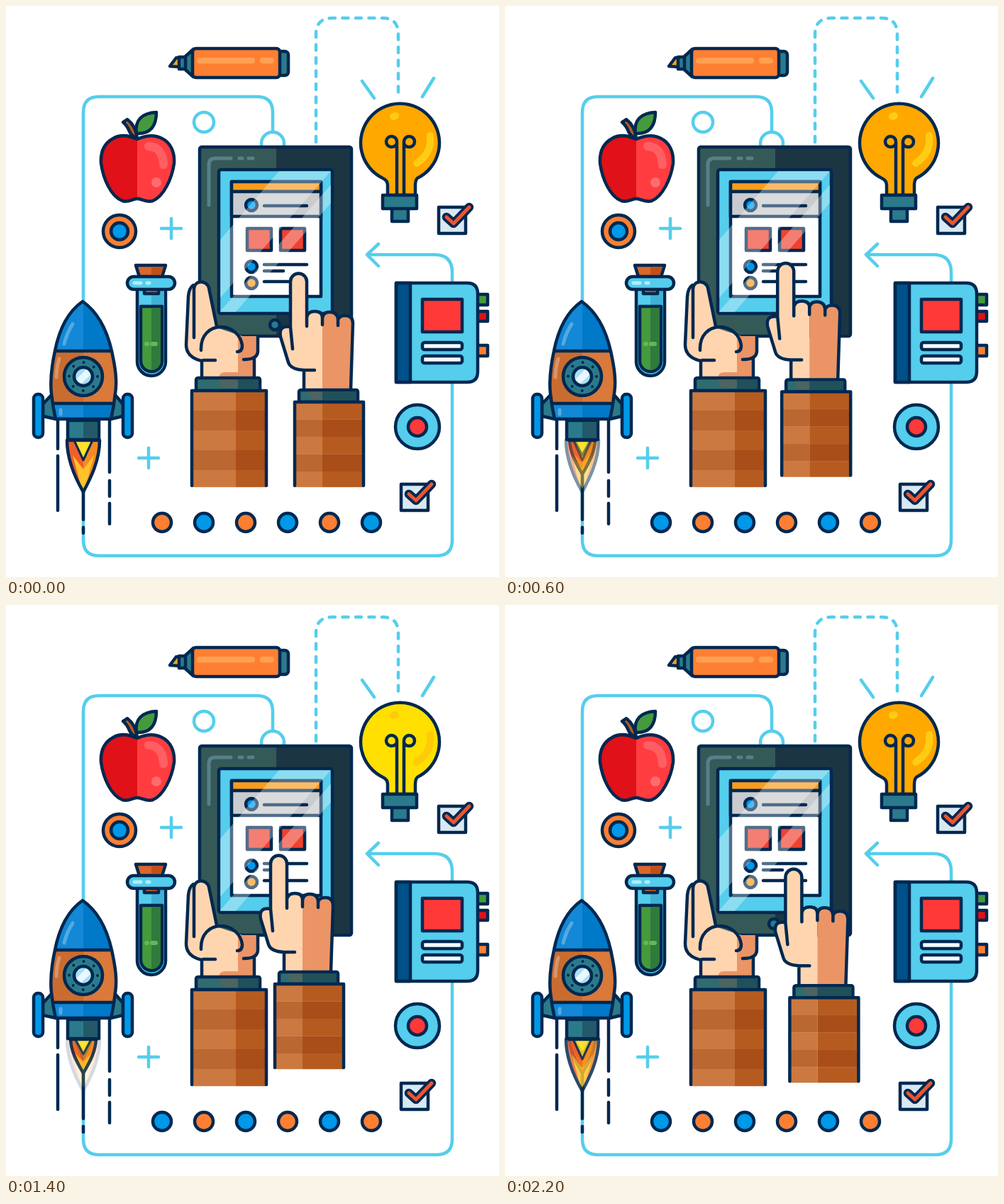
These frames come from a looping animation (695x806 px, 2400 ms). An HTML page:

```html
<!DOCTYPE html>
<html lang="en">
<head>
<meta charset="utf-8">
<title>Learning tools</title>
<style>
html, body { margin: 0; width: 100%; height: 100%; overflow: hidden; background: #fff; }
svg { display: block; width: 100%; height: 100%; }
.o { stroke: #002850; stroke-width: 4.5; stroke-linejoin: round; stroke-linecap: round; }
.n { fill: none; }
.sky { fill: none; stroke: #55ceec; stroke-width: 4.5; stroke-linecap: round; stroke-linejoin: round; }
.teal { fill: #2b7a8b; }
.aqua { fill: #55cdec; }
.blue { fill: #0098e8; }
.orange { fill: #ff7f32; }
.red { fill: #ff3838; }
.skin { fill: #ffd5b0; }
.tan { fill: #eb9566; }
</style>
</head>
<body>
<svg viewBox="0 0 695 806" xmlns="http://www.w3.org/2000/svg">
<defs>
  <path id="appleShape" d="M185 188C174 183 161 181 151 187C138 194 133 206 134 222C137 244 148 269 164 275C173 278 178 272 185 272C192 272 198 278 207 275C222 269 234 244 237 222C238 206 232 193 220 187C209 181 196 183 185 188Z"/>
  <path id="hullShape" d="M108 417C88 431 75 456 69 487C64 510 62 529 64 547Q66 566 70 583H148Q152 566 154 547C157 529 154 510 149 487C142 456 128 431 108 417Z"/>
  <path id="flameShape" d="M86 613H132C132 642 119 667 109 686C98 667 86 642 86 613Z"/>
  <path id="sparkShape" d="M91 613H127C126 633 116 648 109 661C102 648 92 633 91 613Z"/>
  <clipPath id="appleClip"><use href="#appleShape"/></clipPath>
  <clipPath id="hullClip"><use href="#hullShape"/></clipPath>
  <clipPath id="flameClip"><use href="#flameShape"/></clipPath>
  <clipPath id="sparkClip"><use href="#sparkShape"/></clipPath>
  <clipPath id="screenClip"><rect x="302" y="233" width="156" height="199"/></clipPath>
  <g id="check">
    <rect class="o" x="610" y="284" width="38" height="37" fill="#d9e9f3"/>
    <path class="o n" style="stroke-width:12.5" d="M621 298L631 307L653 284"/>
    <path class="n" d="M621 298L631 307L653 284" stroke="#ee552d" stroke-width="5" stroke-linecap="round" stroke-linejoin="round"/>
  </g>
  <path id="plus" class="sky" d="M-14 0H14M0-14V14"/>
</defs>

<!-- connecting lines -->
<path class="sky" d="M376 178V150Q376 128 354 128H131Q109 128 109 150V754Q109 776 131 776H607Q629 776 629 754V376Q629 351 604 351H511M525 336L509 351L525 367"/>
<circle class="sky" cx="376" cy="194" r="16"/>
<path class="sky" d="M437 192V40Q437 17 460 17H531Q553 17 553 40V123" stroke-dasharray="8 10.500"/>
<circle class="sky" cx="279" cy="164" r="14"/>
<use href="#plus" x="233" y="314"/>
<use href="#plus" x="201" y="638"/>

<!-- marker -->
<path class="o" d="M231 85L240 73H246V86Z" fill="#ffa51f"/>
<path class="o teal" d="M244 72H253V89H244ZM253 71L264 61V100L253 90Z"/>
<rect class="o teal" x="383" y="64" width="15" height="34" rx="5"/>
<rect class="o orange" x="263" y="60" width="123" height="41" rx="5"/>
<path d="M273 77H347M362 77H374" stroke="#ffa053" stroke-width="8.500" stroke-linecap="round"/>

<!-- apple -->
<g clip-path="url(#appleClip)">
  <path fill="#e01118" d="M130 175h55v105h-55z"/>
  <path fill="#ff3d41" d="M185 175h55v105h-55z"/>
  <path class="n" d="M201 198Q221 199 222 224" stroke="#ff5f62" stroke-width="12" stroke-linecap="round"/>
  <circle cx="212" cy="249" r="7" fill="#ff6c6e"/>
</g>
<use href="#appleShape" class="o n"/>
<path class="o" d="M165 164L171 160Q183 169 185 187Q177 184 174 177Q171 169 165 164Z" fill="#b65b24"/>
<path class="o" d="M184 180C181 161 192 151 212 150C212 169 204 181 184 180Z" fill="#459a3d"/>

<circle class="o orange" cx="160" cy="318" r="23"/>
<circle class="o blue" cx="160" cy="318" r="12"/>

<!-- test tube -->
<path class="o aqua" d="M185 398V502A20 20 0 0 0 225 502V398Z"/>
<path d="M205 401H223V502A18 18 0 0 1 205 520Z" fill="#3eb2d6"/>
<path class="o" d="M190 424H220V501A15 15 0 0 1 190 501Z" fill="#459a3d"/>
<path d="M205 426H218V501Q217 513 205 514Z" fill="#2f7a3c"/>
<path d="M198 477H199M206 477H211" stroke="#67b55b" stroke-width="6" stroke-linecap="round"/>
<path class="o" d="M183 366H225L220 382H188ZM195 399H215V406H195Z" fill="#dc672b"/>
<path d="M205 368H222L218 381H205ZM205 400H213V404H205Z" fill="#c24f1b"/>
<rect class="o aqua" x="171" y="382" width="67" height="18" rx="9"/>
<path d="M181 391H190M199 391H202" stroke="#b1edfb" stroke-width="5" stroke-linecap="round"/>

<!-- rocket -->
<path class="o n" d="M73 585V625M73 635V712M146 585V658M146 670V692M146 702V731M109 655V725M109 736V744"/>
<g>
  <g clip-path="url(#sparkClip)">
    <path fill="#f26a2a" d="M90 610h19v55h-19z"/>
    <path fill="#f58a22" d="M109 610h20v55h-20z"/>
    <path fill="#ffc229" d="M97 632L109 645L121 632L109 665Z"/>
    <path class="o" style="stroke-width:3" fill="#ffe12e" d="M98 613L109 634L120 613Z"/>
  </g>
  <use href="#sparkShape" class="o n"/>
</g>
<g id="flame">
  <g clip-path="url(#flameClip)">
    <path fill="#ef6029" d="M85 610h24v80h-24z"/>
    <path fill="#f58a22" d="M109 610h24v80h-24z"/>
    <path fill="#ffc229" d="M94 634L109 654L124 634L109 690Z"/>
    <path class="o" style="stroke-width:3" fill="#ffe12e" d="M96 613L109 641L122 613Z"/>
  </g>
  <use href="#flameShape" class="o n"/>
</g>
<path class="o teal" d="M52 562L65 548L70 583L52 579ZM165 562L153 548L148 583L165 579Z"/>
<rect class="o blue" x="39" y="548" width="13" height="61" rx="6"/>
<rect class="o blue" x="165" y="548" width="13" height="61" rx="6"/>
<path class="o teal" d="M87 585H131V612H87Z"/>
<path fill="#235968" d="M109 587h20v23h-20z"/>
<g clip-path="url(#hullClip)">
  <path fill="#1288d6" d="M55 410h54v180H55z"/>
  <path fill="#0079c8" d="M109 410h54v180h-54z"/>
  <path fill="#c96c30" d="M55 487h54v74H55z"/>
  <path fill="#d9793a" d="M109 487h54v74h-54z"/>
  <path class="o" d="M60 487H160M60 561H160"/>
  <path d="M82 477Q86 461 94 449M75 498Q71 512 71 524M77 570V576" class="n" stroke="#ffffff" stroke-opacity=".28" stroke-width="5" stroke-linecap="round"/>
</g>
<use href="#hullShape" class="o n"/>
<circle class="o teal" cx="109" cy="523" r="27"/>
<circle class="n" cx="109" cy="523" r="20" stroke="#002850" stroke-width="4" stroke-linecap="round" stroke-dasharray="0 15.708"/>
<circle class="o" cx="109" cy="523" r="13" fill="#a9def5"/>
<path d="M99 527L113 513A11 11 0 0 1 119 521L106 533Z" fill="#e8f8fe"/>

<!-- tablet -->
<path fill="#355957" d="M273 199h108v267H273z"/>
<path fill="#1c3543" d="M381 199h106v267H381z"/>
<rect class="o n" x="273" y="199" width="214" height="267" rx="3"/>
<path class="n" d="M286 281V224Q286 215 295 215H317M329 215H333M342 215H348" stroke="#56808a" stroke-width="5" stroke-linecap="round"/>
<rect class="o aqua" x="300" y="231" width="160" height="203" rx="3"/>
<rect class="o" x="318" y="248" width="126" height="162" fill="#fff"/>
<path class="o" d="M318 248h126v14H318z" fill="#f79c1d"/>
<path class="o" d="M318 262h126v35H318z" fill="#c9cbce"/>
<path class="o" fill="#f0412f" d="M340 314h34v31h-34zM387 314h34v31h-34z"/>
<circle class="o blue" cx="346" cy="281" r="8"/>
<circle class="o blue" cx="346" cy="368" r="8"/>
<circle class="o" cx="346" cy="391" r="8" fill="#f79c1d"/>
<path class="o" d="M364 282H424M364 365H424M364 374H391M364 389H424"/>
<g clip-path="url(#screenClip)" fill="#fff" opacity=".32">
  <path d="M385 233H458L302 412V330Z"/>
  <path d="M460 250V276L322 434H302V431Z"/>
</g>
<circle class="o teal" cx="379" cy="450" r="7"/>

<!-- holding hand -->
<path class="skin" d="M276 526V501Q254 496 254 478L257 410Q258 394 266 392Q276 384 285 394L297 454L333 466V526Z"/>
<path class="tan" d="M327 466H355V489Q355 497 350 500V526H300Q300 517 309 517H327Z"/>
<path class="o n" d="M276 526V501Q254 496 254 478L257 410Q258 398 264 394M265 468V402C264 386 283 386 286 398L297 452M278 500H295M275 486C274 464 288 453 303 453C318 453 331 464 333 479Q333 488 326 488M355 466V487Q355 499 335 499M350 499V526"/>
<path fill="#2f6c70" class="o" d="M272 525H355Q358 525 358 528V543H268V528Q268 525 272 525Z"/>
<path fill="#20505a" d="M327 527h29v14h-29z"/>
<path fill="#7a5a48" opacity=".4" d="M300 527h27v12h-18q-9-1-9-12z"/>
<g id="leftSleeve"></g>

<!-- pointing hand -->
<g id="hand">
  <path class="skin" d="M420 542V514Q401 513 398 503L387 467Q384 450 401 453V389A11.500 11.500 0 0 1 424 389V436Q427 431 435 431Q446 431 446 440V542Z"/>
  <path class="tan" d="M446 440Q447 432 456 432Q467 432 468 441Q470 437 478 437Q489 437 489 448L486 542H446Z"/>
  <path class="o n" d="M420 542V514M435 514H420Q401 513 398 503L387 467Q384 450 401 453M404 484L401 453V389A11.500 11.500 0 0 1 424 389V452M424 439Q426 431 435 431Q446 431 446 440V450M446 441Q447 432 456 432Q467 432 468 442V451M468 443Q470 437 478 437Q489 437 489 448L486 542"/>
  <path class="o" fill="#2f6c70" d="M417 542H493Q496 542 496 545V559H413V545Q413 542 417 542Z"/>
  <path fill="#20505a" d="M446 544h48v14h-48z"/>
  <path fill="#7a5a48" opacity=".4" d="M426 544h20v12h-12q-8-1-8-12z"/>
  <g id="rightSleeve"></g>
</g>

<!-- bulb -->
<path id="rays" class="sky" d="M502 106L519 130M603 102L587 128"/>
<path id="glass" class="o" d="M538 267V253Q538 246 531 243A55.500 55.500 0 1 1 580 243Q577 246 577 253V267Z"/>
<path id="shine" class="n" d="M598 183C600 202 592 213 579 222M546 156L549 155" stroke-width="10" stroke-linecap="round"/>
<path class="o n" d="M551 266V192A7.500 7.500 0 1 0 543 199Q549 199 551 194M561 266V192A7.500 7.500 0 1 1 568 199Q563 199 561 194"/>
<path class="o teal" d="M531 267H579V286H531ZM544 286H567V304H544Z"/>

<use href="#check"/>
<use href="#check" x="-53" y="391"/>

<!-- notebook -->
<path class="o" fill="#459a3d" d="M662 407h17v15h-17z"/>
<path class="o" fill="#e01118" d="M662 431h17v14h-17z"/>
<path class="o orange" d="M662 479h17v15h-17z"/>
<path class="o aqua" d="M550 391H650Q665 391 665 406V516Q665 531 650 531H550Z"/>
<path class="o" fill="#00508a" d="M550 391h20v140h-20z"/>
<path class="o red" d="M587 414h56v46h-56z"/>
<rect class="o" x="587" y="475" width="56" height="10" rx="3" fill="#f4fbfe"/>
<rect class="o" x="587" y="494" width="56" height="10" rx="3" fill="#f4fbfe"/>

<circle class="o aqua" cx="580" cy="594" r="31"/>
<circle class="o red" cx="580" cy="594" r="13"/>
<g id="dots"></g>
</svg>
<script>
const LOOP = 2400, STEP = 200;
const $ = id => document.getElementById(id);

function add(parent, tag, attrs) {
  const el = document.createElementNS("http://www.w3.org/2000/svg", tag);
  for (const key in attrs) el.setAttribute(key, attrs[key]);
  parent.append(el);
  return el;
}

function drawSleeve(group, left, right, split, top, bottom, band) {
  const light = ["#cb7940", "#bb6731"], dark = ["#b65b20", "#a94e18"];
  for (let y = top, i = 0; y < bottom; y += band, i++) {
    const height = Math.min(band, bottom - y) + 0.2;
    add(group, "rect", { x: left, y, width: split - left, height, fill: light[i % 2] });
    add(group, "rect", { x: split, y, width: right - split, height, fill: dark[i % 2] });
  }
  add(group, "path", { class: "o n", d: `M${left} ${bottom - 2}V${top}H${right}V${bottom - 2}` });
}

drawSleeve($("leftSleeve"), 262, 367, 324, 543, 679, 28);
drawSleeve($("rightSleeve"), 407, 504, 446, 559, 679, 24.5);

const dots = Array.from({ length: 6 }, (_, i) =>
  add($("dots"), "circle", { class: "o", cx: 220 + 59 * i, cy: 729, r: 13 }));

function render(time) {
  const step = Math.floor((time % LOOP) / STEP);
  const swing = step <= 6 ? step : 12 - step;
  const bright = step >= 4 && step < 8;
  const swap = Math.floor(step / 2) % 2;

  $("hand").setAttribute("transform", `translate(${-5.6 * swing} ${-4.8 * swing})`);
  $("flame").setAttribute("opacity", 1 - swing / 6);
  $("glass").setAttribute("fill", bright ? "#ffe000" : "#ffa800");
  $("shine").setAttribute("stroke", bright ? "#ffcb08" : "#ffcc14");
  dots.forEach((dot, i) => dot.setAttribute("fill", (i + swap) % 2 ? "#0098e8" : "#ff7f32"));
}

const start = performance.now();
function tick() {
  render(performance.now() - start);
  requestAnimationFrame(tick);
}
tick();
</script>
</body>
</html>
```
